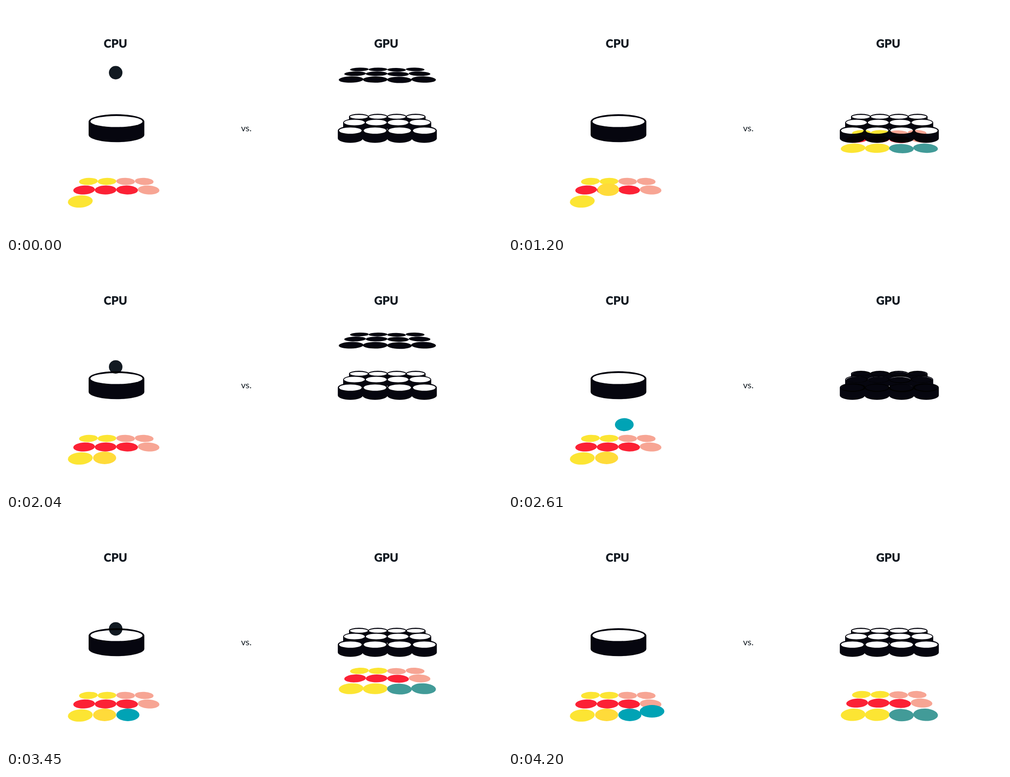
These frames come from a looping animation (1099 px wide and 510 px high, 4230 ms). An HTML page:

```html
<!DOCTYPE html>
<html lang="en">
<head>
<meta charset="utf-8">
<title>CPU vs. GPU</title>
<style>
  html, body { margin: 0; width: 100%; height: 100%; overflow: hidden; background: #fff; }
  svg { display: block; width: 100%; height: 100%; isolation: isolate; }
  text { fill: #121a22; text-anchor: middle; font-family: Lato, sans-serif; }
  .title { font-size: 25.5px; font-weight: 900; }
  .versus { font-size: 20px; }
  #vessels { mix-blend-mode: multiply; }
</style>
</head>
<body>
<svg viewBox="0 0 1099 510">
  <rect width="1099" height="510" fill="#fff"/>
  <g id="discs"></g>
  <!-- Multiplied, so that discs show through the white openings only -->
  <g id="vessels"></g>
  <text class="title" x="242.5" y="93">CPU</text>
  <text class="title" x="842.5" y="93">GPU</text>
  <text class="versus" x="532.5" y="279">vs.</text>
</svg>
<script>
const LOOP = 4230, STEP = 30;
const BLACK = '#06060f', BALL = '#121a22';
const YELLOW = '#fce533', RED = '#fc2135', SALMON = '#f7a594', TEAL = '#429b98';
const TILT = [-3, -1, 2, 3];

const discs = document.getElementById('discs');
const vessels = document.getElementById('vessels');

function add(parent, tag, attrs) {
  const node = document.createElementNS('http://www.w3.org/2000/svg', tag);
  parent.append(node);
  set(node, attrs);
  return node;
}
function set(node, attrs) {
  for (const name in attrs) node.setAttribute(name, attrs[name]);
}
const mix = (a, b, f) => a + (b - a) * f;
const progress = (t, start, end) => Math.min(1, Math.max(0, (t - start) / (end - start)));

function placeDisc(node, cx, cy, rx, ry, fill, tilt = 0) {
  set(node, { cx, cy, rx, ry, fill, transform: `rotate(${tilt} ${cx} ${cy})` });
}
const newDisc = () => add(discs, 'ellipse', {});
const show = (node, visible) => set(node, { visibility: visible ? 'visible' : 'hidden' });

function addVessel(cx, cy, rx, ry, depth, holeRx, holeRy, holeY = cy) {
  add(vessels, 'path', {
    fill: BLACK,
    d: `M${cx - rx} ${cy}a${rx} ${ry} 0 0 1 ${2 * rx} 0v${depth}a${rx} ${ry} 0 0 1 ${-2 * rx} 0z`
  });
  add(vessels, 'ellipse', { cx, cy: holeY, rx: holeRx, ry: holeRy, fill: '#fff' });
}

// Rows from back to front; y and ry hold the values at the top, in the vessel and at the bottom.
const rows = [
  { x: 783, gap: 41.2, rx: 20.7, y: [141.5, 247, 389], ry: [4, 5.3, 8],
    colors: [YELLOW, YELLOW, SALMON, SALMON],
    vessel: { x: 782, gap: 41.9, size: [246.7, 22, 6.7, 9, 19.7, 4.2] } },
  { x: 773.5, gap: 47.6, rx: 24, y: [151, 260, 408], ry: [5, 6.8, 10],
    colors: [RED, RED, RED, SALMON],
    vessel: { x: 772, gap: 48.4, size: [260, 25, 9, 11, 23, 6.2, 259.5] } },
  { x: 764.7, gap: 53.5, rx: 27.4, y: [164, 278, 434], ry: [7, 9.2, 13.7],
    colors: [YELLOW, YELLOW, TEAL, TEAL],
    vessel: { x: 763, gap: 54.6, size: [277.5, 27.8, 10, 17.2, 25, 7] } }
];

// CPU: finished discs, then three jobs one after the other
rows.slice(0, 2).forEach((row, r) => row.colors.forEach((color, c) =>
  placeDisc(newDisc(), row.x - 600.4 + c * row.gap, row.y[2] + 1.7, row.rx, row.ry[2], color, TILT[c])));
placeDisc(newDisc(), 164.6, 435.3, 27.5, 13.7, YELLOW, -4);

const jobs = [
  { start: 0, x: 218.5, rx: 25.6, color: '#ffdb3a' },
  { start: 1588, x: 270, rx: 25.6, color: '#00a3b5' },
  { start: 2938, x: 323, rx: 28, color: '#00a3b5' }
].map(job => ({ ...job, node: newDisc() }));

addVessel(244.8, 257.3, 61.7, 16.2, 29.7, 57.6, 12.3);

// GPU: twelve discs at once, in two passes
const gpuDiscs = rows.flatMap(row => {
  row.colors.forEach((_, c) => addVessel(row.vessel.x + c * row.vessel.gap, ...row.vessel.size));
  return row.colors.map((color, c) => ({ row, c, color, node: newDisc() }));
});
const GPU_SECOND_PASS = 1950;

function drawJob({ node, start, x, rx, color }, time) {
  const t = time - start;
  show(node, t >= 0);
  if (t < 702) {
    placeDisc(node, 243, 148.5 + 0.1835 * Math.max(0, t), 15, 15, BALL);
  } else {
    const f = progress(t, 702, 1291);
    placeDisc(node, mix(243, x, f), mix(272, 434, f), mix(15, rx, f), mix(15, 13.9, f), color);
  }
}

function drawGpuDisc({ node, row, c, color }, t) {
  const done = t >= 1002;
  const f = done ? progress(t, 1002, 1795) : progress(t, 0, 530);
  const from = done ? 1 : 0;
  const at = values => mix(values[from], values[from + 1], f);
  const sag = c === 2 ? 0.6 : -0.2;
  placeDisc(node, row.x + c * row.gap, at(row.y) + sag, row.rx, at(row.ry),
    done ? color : BLACK, TILT[c] * (done ? 1 : 0.5));
}

function draw() {
  const time = Math.floor(performance.now() % LOOP / STEP) * STEP;
  jobs.forEach(job => drawJob(job, time));
  const passTime = time < GPU_SECOND_PASS ? time : time - GPU_SECOND_PASS;
  gpuDiscs.forEach(disc => drawGpuDisc(disc, passTime));
  requestAnimationFrame(draw);
}
draw();
</script>
</body>
</html>
```
